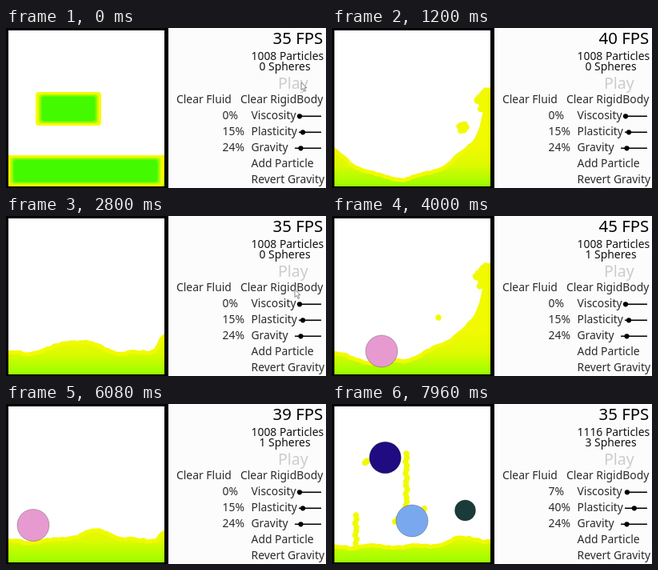
Write an HTML page that moves like this. It is 400 px wide and 200 px high and loops after 8 s.

```html
<!DOCTYPE html>
<html lang="en">
<head>
<meta charset="utf-8">
<title>Fluid simulation</title>
<style>
  html, body { margin: 0; width: 100%; height: 100%; overflow: hidden; background: #fcfcfc; }
  svg { display: block; width: 100vw; height: 100vh; }
  text { font-family: "Noto Sans", "Open Sans", sans-serif; font-size: 13.9px; fill: #2a2a2a; white-space: pre; }
  .big { font-size: 20.4px; fill: #000; }
  .dark { fill: #111; }
  .off { font-size: 19.5px; fill: #ccc; }
</style>
</head>
<body>
<svg id="stage" viewBox="0 0 400 200">
  <defs>
    <clipPath id="tank"><path d="M3 3H198V198H3z"/></clipPath>
    <linearGradient id="depth" gradientUnits="userSpaceOnUse" x1="0" y1="145" x2="0" y2="198">
      <stop stop-color="hsl(62 100% 49%)"/>
      <stop offset=".5" stop-color="hsl(67 100% 49%)"/>
      <stop offset="1" stop-color="hsl(84 100% 50%)"/>
    </linearGradient>
  </defs>
  <path fill="#fcfcfc" d="M0 0H400V200H0z"/>
  <path d="M0 0H203V200H0z"/>
  <path fill="#fff" d="M3 3H198V198H3z"/>
  <g id="fluid" clip-path="url(#tank)"></g>
  <g id="balls"></g>
  <g id="panel"></g>
  <path id="cursor" fill="#fff" stroke="#777" stroke-width=".9" d="M0 0V9.5L2.3 7.4L4 11.2L5.6 10.5L4 6.8H7z"/>
</svg>
<script>
const LOOP = 8000, STEP = 40, CUT = 7240, LEFT = 3, WIDTH = 195;
const YELLOW = '#f1fa00';
const $ = id => document.getElementById(id);

function set(el, attrs) {
  for (const k in attrs) el.setAttribute(k, attrs[k]);
}
function add(parent, tag, attrs, text = '') {
  const el = document.createElementNS(parent.namespaceURI, tag);
  set(el, attrs);
  el.textContent = text;
  return parent.appendChild(el);
}
function show(el, on) {
  el.setAttribute('visibility', on ? 'visible' : 'hidden');
}

// Repeatable random number from 0 to 1.
function rand(i) {
  const v = Math.sin(i * 12.9898 + 4.1) * 43758.5453;
  return v - Math.floor(v);
}
const times = (n, f) => Array.from({ length: n }, (_, i) => f(i));
const mix = (a, b, u) => a + (b - a) * u;

// Eased value between keys of the form { t, name: value, ... }.
function track(keys, t) {
  const next = keys.findIndex(k => k.t > t);
  if (next < 1) return keys[next ? keys.length - 1 : 0];
  const a = keys[next - 1], b = keys[next];
  const u = (t - a.t) / (b.t - a.t), ease = u * u * (3 - 2 * u);
  return Object.fromEntries(Object.keys(a).map(k => [k, mix(a[k], b[k], ease)]));
}

// The pool: a level, a parabolic bowl, one hump and a jet up the right wall.
const pose = (t, level, extra) => ({ t, level, bowl: 0, mid: .4, hump: 0, peak: .46, jet: 0, ...extra });
const slosh = [
  pose(40, 159),
  pose(440, 161),
  pose(1200, 166, { bowl: 200, mid: .42, jet: 45 }),
  pose(2000, 167),
  pose(2800, 169, { hump: 15, peak: .44, jet: 22 }),
  pose(3500, 168, { mid: .3 }),
  pose(4000, 166, { bowl: 150, mid: .3, jet: 50 }),
  pose(5160, 170, { hump: 17, peak: .48, jet: 18 }),
  pose(7000, 169, { hump: 8, peak: .64, jet: 6 })
];
const settle = [
  pose(CUT, 172, { hump: 5, peak: .7 }),
  pose(7960, 176, { hump: 11, peak: .86 })
];

function surface(p, u, t) {
  const rough = Math.min(1, Math.max(0, t - 40) / 500);
  return p.level + p.bowl * (.1 - (u - p.mid) ** 2)
    - p.hump * Math.exp(-(((u - p.peak) / .17) ** 2))
    - p.jet * Math.exp(-(((1 - u) / .05) ** 2))
    + rough * 1.6 * Math.sin(u * 23 + t / 260);
}

const fluid = $('fluid');
const drops = add(fluid, 'path', { fill: YELLOW });

function block(x, y, w, h) {
  const g = add(fluid, 'g', {});
  times(9, d => add(g, 'rect', {
    x: x + d, y: y + d * .75, width: w - 2 * d, height: h - 1.5 * d, rx: 4,
    fill: `hsl(${mix(60, 104, Math.max(0, d - 2) / 6)} 100% 49%)`
  }));
  return g;
}
const falling = block(37, 80, 82, 42);
const pool = add(fluid, 'path',
  { fill: 'url(#depth)', stroke: YELLOW, 'stroke-width': 5, 'stroke-linejoin': 'round' });
const resting = block(2, 159, 195, 39);

const dot = (x, y, r = 3.7) =>
  `M${(x - r).toFixed(1)} ${y.toFixed(1)}a${r} ${r} 0 1 0 ${2 * r} 0a${r} ${r} 0 1 0 ${-2 * r} 0`;

// Loose drops at a moment, with their speed and pull.
const clump = (x, y, n, size) => times(n, i =>
  [x + (rand(i + 1) - .5) * size, y + (rand(i + 31) - .5) * size]);
const stream = (x, top, bottom) => times(Math.round((bottom - top) / 5), i =>
  [x + Math.sin(i * 2.3), top + i * 5]);
const sprays = [
  { at: 1200, vy: -.04, g: .0005, span: 400, spots: clump(163, 124, 12, 10) },
  { at: 4000, vy: -.05, g: .0005, span: 400, spots: clump(133, 127, 1, 0) },
  { at: 7960, vy: .07, g: 0, span: 720, spots: [
    ...stream(30, 139, 186), ...stream(93, 62, 130), ...clump(42, 73, 3, 5),
    ...clump(80, 146, 3, 8), ...clump(114, 132, 2, 5)] }
];

function drawFluid(t) {
  const p = track(t < CUT ? slosh : settle, t);
  const line = times(57, i => {
    const u = (i - 2) / 52;
    const y = surface(p, Math.min(1, Math.max(0, u)), t) + 2.5 + (t > 40 ? rand(i) * 2 - 1 : 0);
    return `${(LEFT + WIDTH * u).toFixed(1)} ${y.toFixed(1)}`;
  });
  set(pool, { d: `M-8 210L${line.join('L')}V210z` });

  let d = '';
  for (const s of sprays) {
    const e = t - s.at;
    if (Math.abs(e) > s.span) continue;
    for (const [x, y] of s.spots) d += dot(x, y + s.vy * e + s.g * e * e / 2);
  }
  // A high jet curls over into a lump beside the wall.
  const curl = p.jet / 45, top = surface(p, 1, t);
  if (curl > .55) {
    d += times(30, i => dot(196 - rand(i + 5) * 15 * curl, top + 3 + rand(i + 60) * 24 * curl)).join('');
  }
  set(drops, { d });
}

function ball(r, fill, from, to, keys) {
  const el = add($('balls'), 'circle', { r, fill, stroke: '#000', 'stroke-opacity': .3, 'stroke-width': .8 });
  return { el, from, to, keys };
}
const at = (t, x, y) => ({ t, x, y });
const balls = [
  ball(20, '#e69ad0', 3240, CUT, [at(3400, 75, 62), at(4000, 62, 169), at(5160, 20.5, 160), at(7000, 47.5, 143)]),
  ball(19.8, '#200c80', CUT, LOOP, [at(CUT, 66, 22), at(7960, 66.5, 67)]),
  ball(20, '#7aa8ee', CUT, LOOP, [at(CUT, 97, 126), at(7960, 100, 146)]),
  ball(13, '#1a3b3a', CUT, LOOP, [at(CUT, 166, 72), at(7960, 166.5, 133)])
];

const panel = $('panel');
const label = (x, y, str, cls = '') => add(panel, 'text', { x, y, class: cls }, str);
const fps = label(333.5, 20, '', 'big');
const count = label(306.5, 40, '', 'dark');
const spheres = label(316.5, 53, '', 'dark');
label(340, 75.5, 'Play', 'off');
label(213, 94, 'Clear Fluid');
label(293, 94, 'Clear RigidBody');
label(306.5, 173.5, 'Add Particle');
label(306.5, 193.5, 'Revert Gravity');

function slider(name, y, x, first, later) {
  label(306.5, y, name);
  add(panel, 'path', { d: `M${x} ${y - 3.2}H394`, stroke: '#000', 'stroke-width': 1.6 });
  const value = label(270.5, y, '');
  const knob = add(panel, 'circle', { cy: y - 3.2, r: 3.1 });
  return t => {
    const percent = t < CUT ? first : later;
    value.textContent = percent + '%';
    set(knob, { cx: x + 1 + percent * .27 });
  };
}
const sliders = [
  slider('Viscosity', 113.5, 366, 0, 7),
  slider('Plasticity', 133.5, 366, 15, 40),
  slider('Gravity', 153.5, 361, 24, 24)
];

const rate = [[0, 35], [1200, 40], [2800, 35], [4000, 45], [5160, 40], [7000, 38], [7960, 35]]
  .map(([t, value]) => ({ t, value }));
const moves = [
  [at(0, 369, 68), at(240, 373, 70), at(640, 206, 120)],
  [at(2360, 300, 140), at(2800, 361, 92), at(3200, 369, 70), at(3680, 206, 84)]
];

function draw(t) {
  drawFluid(t);

  const age = Math.max(0, t - 40);
  show(falling, t < 760);
  set(falling, { transform: `translate(0 ${.00025 * age * age})` });
  show(resting, t < 460);
  set(resting, { opacity: Math.max(0, 1 - age / 420) });

  const live = balls.filter(b => t >= b.from && t < b.to);
  balls.forEach(b => show(b.el, live.includes(b)));
  for (const { el, keys } of live) {
    const { x, y } = track(keys, t);
    set(el, { cx: x, cy: y });
  }

  fps.textContent = Math.round(track(rate, t).value) + ' FPS';
  count.textContent = (t < CUT ? 1008 : 1116) + ' Particles';
  spheres.textContent = live.length + ' Spheres';
  sliders.forEach(update => update(t));

  const path = moves.find(m => t >= m[0].t && t < m[m.length - 1].t);
  show($('cursor'), path);
  if (path) {
    const { x, y } = track(path, t);
    set($('cursor'), { transform: `translate(${x} ${y})` });
  }
}

const start = performance.now();
function tick() {
  const t = (performance.now() - start) % LOOP;
  draw(Math.floor(t / STEP) * STEP);
  requestAnimationFrame(tick);
}
tick();
</script>
</body>
</html>
```
